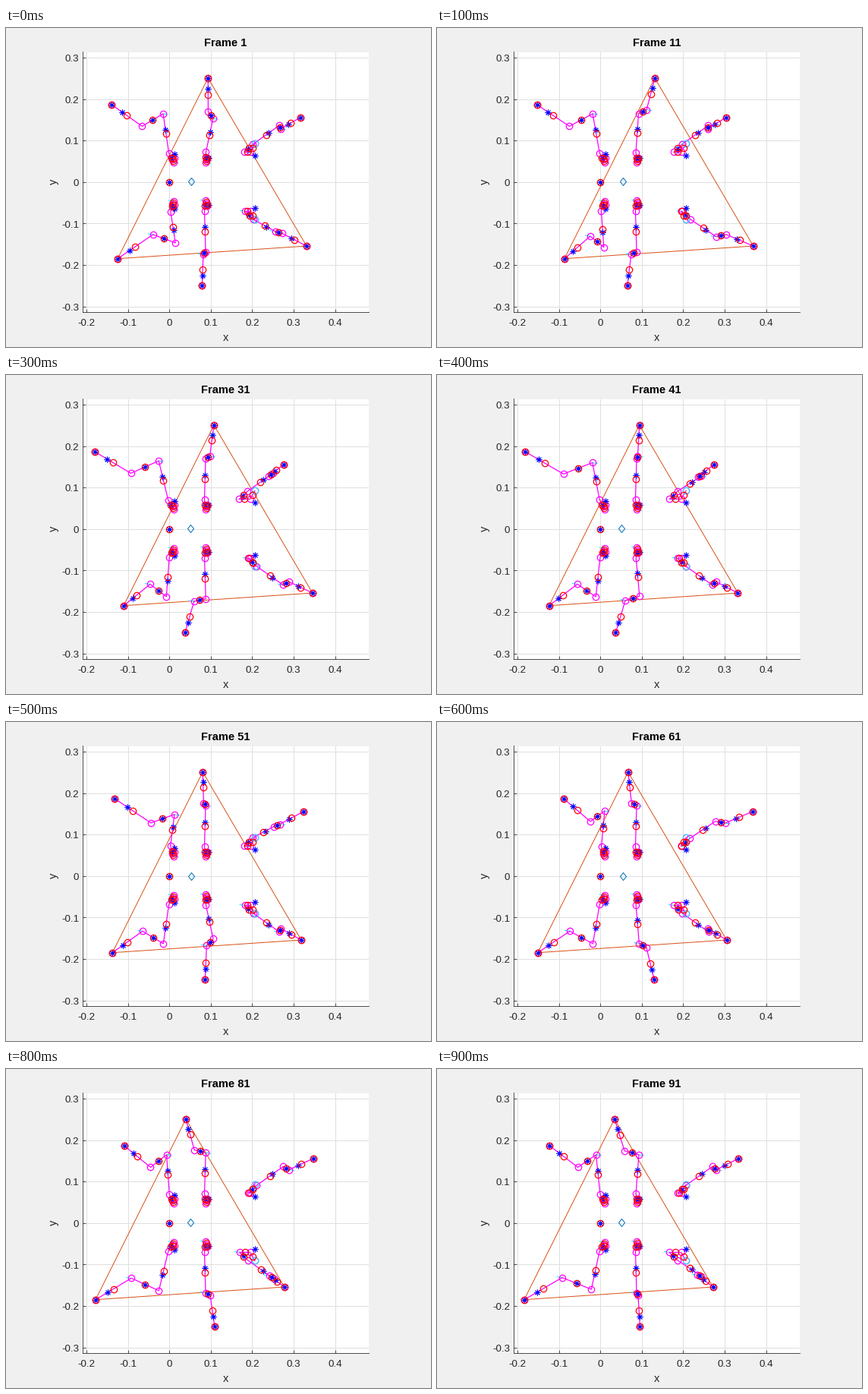
Animation of 560x420 px, one loop 1000 ms. Source, as a matplotlib script:

```python
import numpy as np
import matplotlib.pyplot as plt
from matplotlib.animation import FuncAnimation

plt.rcParams["font.family"] = "Liberation Sans"

W, H, DPI = 560, 420, 100
PX = 72 / DPI                      # one pixel in points
SCALE = 546                        # pixels per data unit
X0, Y0 = 215.2, 202.8              # stage position of the data origin
LEFT, RIGHT, TOP, BOTTOM = 101.2, 478, 31.5, 374
INK = "#262626"
GAP = (np.nan, np.nan)

# Gait: one cycle lasts PERIOD steps, the two tripods are half a cycle apart.
PERIOD = 102.4
STANCE_SPEED = 0.74
SWING_HALF = 15
FOOT_MID = 141.3
TRIPODS = [[("rear", -1), ("middle", 1), ("front", -1)],
           [("rear", 1), ("middle", -1), ("front", 1)]]

# Ankle, knee and hip: rest x, distance from the body axis, share of the foot's
# travel, and the shift (x, outward) at the top of a swing. All in pixels.
LEGS = {
    "rear": dict(
        foot=(0, 101.3), peak=0, shin=0.34, mark=(222, 36),
        chain=[(180, 73, 0.67, 9, -3.5), (207.6, 89.5, 0.27, 14, -9),
               (215.1, 37.7, 0.04, 2, 1.7)],
        base=[(221, 25.5), (219.8, 29.5), (222, 31)]),
    "middle": dict(
        foot=(119, 136.5), peak=-1.5, shin=0.31, mark=(267.5, 31),
        chain=[(260.5, 95.7, 0.55, 2.2, -3.7), (263.5, 92.3, 0, 10, -9.3),
               (262, 38.5, 0, 2, 0.5)],
        base=[(263.7, 25), (264.5, 29), (265.5, 31.5)]),
    "front": dict(
        foot=(248.8, 84.6), peak=-3, shin=0.62, mark=(328.5, 34.5),
        chain=[(362.5, 69.8, 0.69, -4, -2), (360.4, 74, 0.33, -8.5, -9.5),
               (325.8, 49.3, 0.31, -1.5, 0.7)],
        base=[None, (322, 39), (328.5, 50)]),
}


def centred(phase):
    """Phase wrapped to half a cycle either side of zero."""
    return (phase + PERIOD / 2) % PERIOD - PERIOD / 2


def foot_x(phase):
    """Steady drift in stance, sine-eased return in swing."""
    p = centred(phase + 2)
    swing = np.sin(np.pi / 2 * np.clip(p / SWING_HALF, -1, 1))
    return FOOT_MID + STANCE_SPEED * (PERIOD / 2 * swing - p)


def blend(a, b, f):
    return a + (b - a) * f


def to_data(points, side=1):
    points = np.array(points, float)
    return np.column_stack([points[:, 0] - 215.7, side * points[:, 1] + 0.4]) / SCALE


def leg_shape(name, side, phase):
    """Joints, link centres, masses and cyan dashes of one leg."""
    leg = LEGS[name]
    dx, reach = leg["foot"]
    travel = foot_x(phase) - 140
    lift = np.exp(-(centred(phase - leg["peak"]) / 7) ** 2 / 2)
    ankle, knee, hip = [np.array([x + gain * travel + lx * lift, y + ly * lift])
                        for x, y, gain, lx, ly in leg["chain"]]
    base = [p or (hip[0] - 11, 39) for p in leg["base"]]
    joints = np.array([(140 + travel + dx, reach), ankle, knee, hip, *base])
    centres = [joints[0], *(joints[1:] + joints[:-1]) / 2]
    thigh = 0.6 if (name, side) == ("middle", -1) else 0.4
    masses = [joints[0],
              blend(joints[0], ankle, leg["shin"]),
              blend(ankle, knee, 0.5),
              blend(knee, hip, thigh),
              blend(hip, joints[4], 0.55),
              leg["mark"]]
    tip = max((ankle, knee), key=lambda p: side * p[0])
    dashes = []
    for p in (tip, joints[4]):
        dashes += [p, p + (6.5 * side, -1), GAP]
    return [to_data(p, side) for p in (joints, centres, masses, dashes)]


fig = plt.figure(figsize=(W / DPI, H / DPI), dpi=DPI, facecolor="#f0f0f0")
ax = fig.add_axes([LEFT / W, 1 - BOTTOM / H, (RIGHT - LEFT) / W, (BOTTOM - TOP) / H])
ax.set_xlim((LEFT - X0) / SCALE, (RIGHT - X0) / SCALE)
ax.set_ylim((Y0 - BOTTOM) / SCALE, (Y0 - TOP) / SCALE)
ax.set_xticks(np.arange(-2, 5) / 10, [])
ax.set_yticks(np.arange(-3, 4) / 10, [])
ax.tick_params(direction="in", length=4 * PX, width=PX * 0.8, color=INK)
ax.grid(color="#dfdfdf", lw=PX)
ax.set_axisbelow(True)
ax.spines[["top", "right"]].set_visible(False)
ax.spines[["left", "bottom"]].set(color=INK, linewidth=PX * 0.8)


def label(x, y, text, size=13.33, **style):
    style = {"ha": "center", "va": "baseline", "color": INK, **style}
    return fig.text(x / W, 1 - y / H, text, fontsize=size * PX, **style)


for n in range(-2, 5):
    label(X0 + n / 10 * SCALE, 392.3, f"{n / 10:g}")
for n in range(-3, 4):
    label(96, Y0 - n / 10 * SCALE + 5.2, f"{n / 10:g}", ha="right")
label(289.3, 412.5, "x", 14.67)
label(63, 202, "y", 14.67, rotation=90, va="center")
title = label(289.3, 24.2, "", 14.67, weight="bold", color="black")


def artist(color, marker="", line="none", size=8.4, width=1.25):
    return ax.plot([], [], color=color, marker=marker, ls=line, lw=width * PX,
                   ms=size * PX, mew=width * PX, mfc="none", clip_on=False)[0]


diamond = [(0, 1), (0.8, 0), (0, -1), (-0.8, 0), (0, 1)]
body = artist("#0072bd", diamond, size=10, width=1)
triangle = artist("#d95319", line="-", width=1)
cyan_dash = artist("cyan", line="-", width=1)
links = artist("magenta", "o", "-")
cyan_ring = artist("cyan", "o", width=1)
stars = artist("blue", (8, 2, 0), size=7.8, width=1)
centre_rings = artist("red", "o")
cyan_ring.set_data(*to_data([(328.5, 50), (328.5, -50)]).T)


def draw(k):
    step = 10 * k
    title.set_text(f"Frame {step + 1}")
    joints, dashes, feet = [], [], []
    centres, masses = [(0, 0)], [(0, 0)]
    for n, tripod in enumerate(TRIPODS):
        for name, side in tripod:
            j, c, m, d = leg_shape(name, side, step + n * PERIOD / 2)
            joints += [*j, GAP]
            centres += [*c]
            masses += [*m]
            dashes += [*d]
            if n == 0:
                feet.append(j[0])
    for line, points in ((links, joints), (centre_rings, centres), (stars, masses),
                         (cyan_dash, dashes), (triangle, feet + feet[:1])):
        line.set_data(*np.array(points).T)

    mean_foot = (foot_x(step) + foot_x(step + PERIOD / 2)) / 2
    sway = np.cos(2 * np.pi * (step - 10) / PERIOD)
    body.set_data([(28.8 + 0.1 * (mean_foot - 143)) / SCALE], [(0.6 + 0.6 * sway) / SCALE])
    return links, centre_rings, stars, cyan_dash, triangle, body, title


anim = FuncAnimation(fig, draw, frames=10, interval=100, repeat=True, repeat_delay=0)
plt.show()
```
